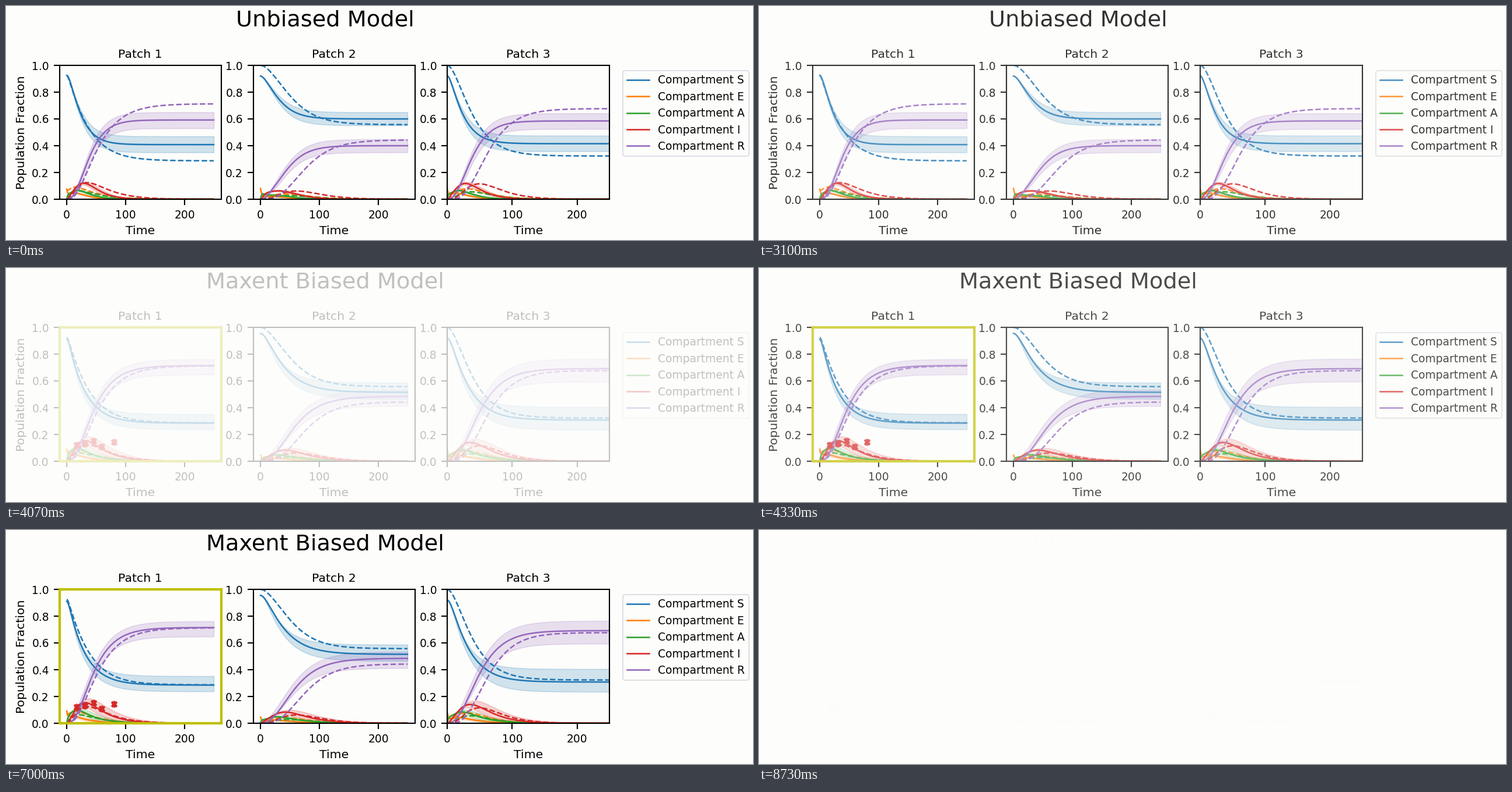
Recreate the animation shown at these times as a matplotlib script. Size 1280x402 px, loop 8760 ms.

```python
import numpy as np
import matplotlib.pyplot as plt
from matplotlib.animation import FuncAnimation

W, H, DPI = 1280, 402, 160
PT = 153 / 160                      # point scale of the drawing
LOOP, STEP = 8760, 20
BACK = (253, 253, 251)
COLORS = dict(S="tab:blue", E="tab:orange", A="tab:green", I="tab:red", R="tab:purple")
PANELS = [(91.5, 368.5), (423.5, 700.5), (756, 1033.5)]
TOP, BOTTOM = 102, 332

plt.rcParams.update({
    "font.family": "DejaVu Sans",
    "axes.labelsize": 9.6 * PT, "axes.titlesize": 9.6 * PT, "axes.titlepad": 6 * PT,
    "axes.labelpad": 4 * PT, "axes.linewidth": PT, "axes.facecolor": "none",
    "lines.linewidth": 1.2 * PT, "patch.linewidth": 0.8 * PT,
    "legend.fontsize": 8.8 * PT,
})
for axis in ("xtick", "ytick"):
    plt.rcParams.update({f"{axis}.labelsize": 8.8 * PT, f"{axis}.major.size": 4.8 * PT,
                         f"{axis}.major.width": PT, f"{axis}.major.pad": 3.5 * PT})

DT = 0.5
time = np.arange(0, 249 + DT, DT)

# Susceptible curves: start, end, half time, decay rate, initial lag
REFERENCE = [(0.925, 0.287, 28, 0.032, 2),
             (1.0, 0.557, 49, 0.033, 12),
             (1.0, 0.323, 36, 0.038, 10)]
# Mean stays in E, A and I
REFERENCE_STAY = (7, 5, 12)

SCENES = [
    dict(title="Unbiased Model", stay=(3, 4.6, 10), observed=False,
         curves=[(0.925, 0.408, 21, 0.055, 4),
                 (0.92, 0.60, 29, 0.047, 5),
                 (0.922, 0.415, 21, 0.054, 4)],
         spread=[(0.062, 0.058), (0.05, 0.048), (0.06, 0.057)],
         power=2, early=(0.012, 0.015), stretch=1.09),
    dict(title="Maxent Biased Model", stay=(3, 6.5, 13), observed=True,
         curves=[(0.91, 0.285, 23, 0.036, 3),
                 (0.955, 0.515, 35, 0.032, 8),
                 (0.92, 0.308, 27, 0.038, 6)],
         spread=[(0.067, 0.047), (0.072, 0.05), (0.097, 0.073)],
         power=3, early=(0.0, 0.045), stretch=1.2),
]


def remaining(half, rate, lag):
    """Share of the fall in S that is still to come; flat at first, then exponential."""
    warp = lambda t: t - lag * (1 - np.exp(-t / lag))
    c = np.exp(rate * warp(half)) - 2
    return (1 + c) / (c + np.exp(rate * warp(time)))


def compartments(curve, stay):
    """Pass the outflow of S through the chain E, A, I, R."""
    start, end, *shape = curve
    g = remaining(*shape)
    s = end + (start - end) * g
    levels = np.zeros((len(time), 3))
    levels[0, 0] = 1 - start
    for i in range(1, len(time)):
        out = levels[i - 1] * (1 - np.exp(-DT / np.array(stay)))
        inflow = np.array([s[i - 1] - s[i], out[0], out[1]])
        levels[i] = levels[i - 1] + inflow - out
    e, a, inf = levels.T
    return dict(S=s, E=e, A=a, I=inf, R=1 - s - e - a - inf), g


def bands(values, g, scene, spread):
    up, low = (w * (1 - g) ** scene["power"] + early * 4 * g * (1 - g)
               for w, early in zip(spread, scene["early"]))
    result = dict(S=(values["S"] - low, values["S"] + up),
                  R=(np.maximum(values["R"] - up, 0), values["R"] + low))
    k = scene["stretch"]
    for name in "EAI":
        v = values[name]
        result[name] = (np.interp(time * k, time, v) / k, np.interp(time / k, time, v) * k)
    return result


def draw_panel(fig, index, scene):
    left, right = PANELS[index]
    ax = fig.add_axes([left / W, 1 - BOTTOM / H, (right - left) / W, (BOTTOM - TOP) / H])
    values, g = compartments(scene["curves"][index], scene["stay"])
    reference, _ = compartments(REFERENCE[index], REFERENCE_STAY)
    limits = bands(values, g, scene, scene["spread"][index])
    for name, color in COLORS.items():
        ax.plot(time, values[name], color=color)
        ax.fill_between(time, *limits[name], color=color, alpha=0.2)
        ax.plot(time, reference[name], "--", color=color)
    if scene["observed"] and index == 0:
        ax.errorbar([17, 31, 45, 59, 80], [0.12, 0.13, 0.152, 0.11, 0.143], yerr=0.026,
                    fmt="X", color=COLORS["I"], ms=4.8 * PT, mew=0.5 * PT,
                    elinewidth=1.2 * PT, zorder=5)
        for spine in ax.spines.values():
            spine.set(color="y", linewidth=2 * PT)
    margin = 0 if index == 2 else 12.45
    ax.set(xlim=(-margin, 249 + margin), ylim=(0, 1), xlabel="Time", title=f"Patch {index + 1}",
           xticks=[0, 100, 200], yticks=np.linspace(0, 1, 6))
    if index == 0:
        ax.set_ylabel("Population Fraction")
    return ax


def render(fig, scene):
    """Draw one scene and keep its pixels for the fades."""
    fig.clear()
    for index in range(3):
        draw_panel(fig, index, scene)
    fig.text(547 / W, 1 - 34.5 / H, scene["title"], size=18 * PT, ha="center", va="baseline")
    handles = [plt.Line2D([], [], color=c, label=f"Compartment {n}") for n, c in COLORS.items()]
    fig.legend(handles=handles, loc="upper left", bbox_to_anchor=(1057 / W, 1 - 111 / H),
               borderaxespad=0, facecolor="none", edgecolor="#d0d0dc")
    fig.canvas.draw()
    return np.asarray(fig.canvas.buffer_rgba())[..., :3].astype(np.float32)


fig = plt.figure(figsize=(W / DPI, H / DPI), dpi=DPI, facecolor=np.array(BACK) / 255)
unbiased, biased = [render(fig, scene) for scene in SCENES]
fig.clear()
back = np.array(BACK, dtype=np.float32)
picture = fig.figimage(unbiased.astype(np.uint8))


def update(i):
    t = (i + 0.5) * STEP
    if t < 3770:
        scene, alpha = unbiased, np.interp(t, [3000, 3567], [1, 0])
    else:
        scene, alpha = biased, np.interp(t, [3933, 4500, 8067, 8733], [0, 1, 1, 0])
    picture.set_data((back + np.float32(alpha) * (scene - back)).round().astype(np.uint8))
    return [picture]


anim = FuncAnimation(fig, update, frames=LOOP // STEP, interval=STEP, repeat=True,
                     repeat_delay=0, blit=False)
plt.show()
```
